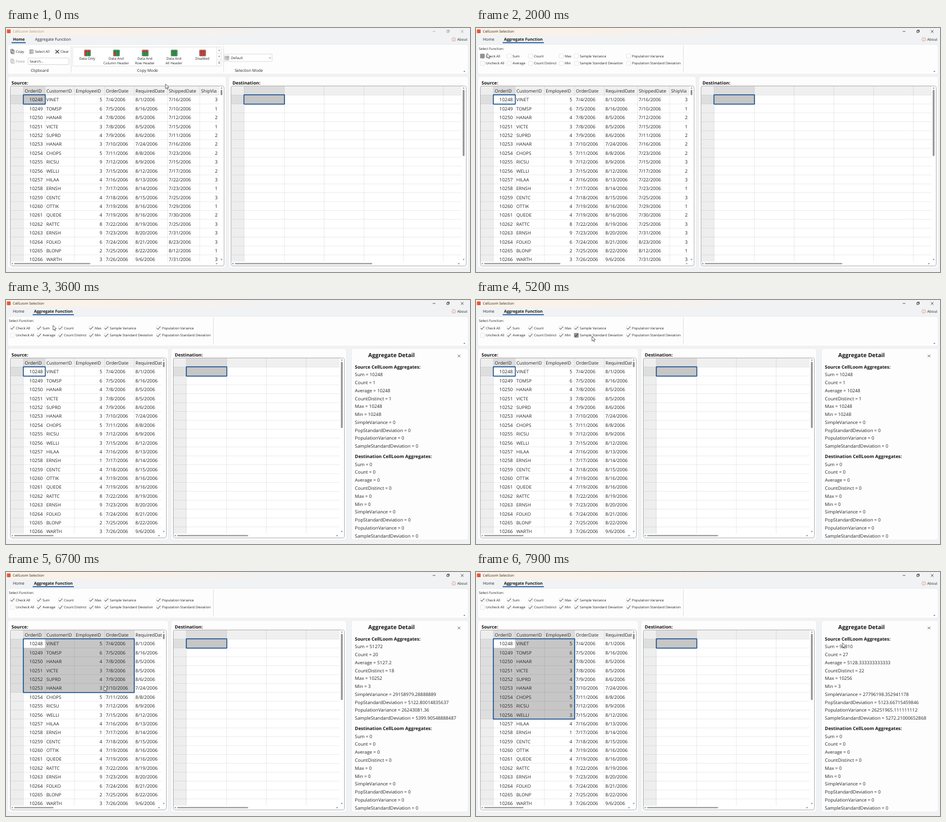
Recreate the animation shown at these times as an HTML page. Size 800 by 423 pixels, loop 8 s.

```html
<!DOCTYPE html>
<html lang="en">
<head>
<meta charset="utf-8">
<title>Grid selection</title>
<style>
html, body { margin: 0; width: 100%; height: 100%; overflow: hidden; background: #f1f2f4; }
svg { display: block; }
#stage { width: 800px; height: 423px; }
text { font-family: "Open Sans", "Noto Sans", sans-serif; fill: #262626; white-space: pre; text-rendering: geometricPrecision; }
.b { font-weight: 700; fill: #151515; }
.dim { fill: #9a9a9a; }
.mid { text-anchor: middle; }
.end { text-anchor: end; }
</style>
</head>
<body>
<svg id="stage" viewBox="0 0 800 423">
  <defs>
    <linearGradient id="bar">
      <stop offset="0" stop-color="#fcf2e6"/>
      <stop offset=".3" stop-color="#f9f1e9"/>
      <stop offset=".6" stop-color="#f2f2f4"/>
      <stop offset="1" stop-color="#f1f2f4"/>
    </linearGradient>
  </defs>
  <g id="ui"></g>
  <path id="cursor" d="M0 0V8.2L1.9 6.5L3.2 9.3L4.5 8.7L3.2 6H5.8Z" fill="#fff" stroke="#333" stroke-width=".7"/>
</svg>
<script>
const LOOP = 8000, STEP = 100;
const CLICK_TAB = 1100, CLICK_ALL = 2100, LAG = 150;
const ROW_H = 15.39, HEAD_H = 15.8;
const BLUE = '#17569b', GREEN = '#2fa24f', RED = '#dc4a3e';

// time, x, y of the pointer tip
const PATH = [
  [0, 275, 97], [200, 262, 86], [900, 80, 20], [1250, 80, 20], [1800, 19, 44], [2100, 19, 44],
  [2500, 708, 191], [2800, 694, 186], [3300, 58, 46], [3600, 81, 44], [4100, 116, 46],
  [4600, 190, 46], [5200, 200, 63], [5400, 190, 68], [5850, 46, 121], [6000, 48, 122],
  [6700, 169, 198], [7150, 150, 244], [7400, 150, 244], [7900, 632, 123]
];
// time, columns, rows of the dragged selection
const DRAG = [[0, 1, 1], [6100, 2, 2], [6300, 3, 3], [6500, 4, 5], [6650, 4, 6], [6900, 3, 7], [7050, 3, 8], [7150, 3, 9]];

// customer, employee, order day, shipping day (days of July), carrier
const ORDERS = `VINET 5 4 16 3,TOMSP 6 5 10 1,HANAR 4 8 12 2,VICTE 3 8 15 1,SUPRD 4 9 11 2,
HANAR 3 10 16 2,CHOPS 5 11 23 2,RICSU 9 12 15 3,WELLI 3 15 17 2,HILAA 4 16 22 3,ERNSH 1 17 23 1,
CENTC 4 18 25 3,OTTIK 4 19 29 1,QUEDE 4 19 30 2,RATTC 8 22 25 3,ERNSH 9 23 31 3,FOLKO 6 24 54 3,
BLONP 2 25 43 1,WARTH 3 26 31 3`;
const TERMS = { 1: 42, 5: 14, 18: 42 };
const date = d => (d > 62 ? `9/${d - 62}` : d > 31 ? `8/${d - 31}` : `7/${d}`) + '/2006';
const ROWS = ORDERS.split(',').map((line, i) => {
  const [who, emp, day, ship, via] = line.trim().split(' ');
  return [10248 + i, who, +emp, date(+day), date(+day + (TERMS[i] || 28)), date(+ship), +via];
});
const HEADS = ['OrderID', 'CustomerID', 'EmployeeID', 'OrderDate', 'RequiredDate', 'ShippedDate', 'ShipVia'];
const SRC_EDGES = [22.5, 60, 110.5, 162.5, 213.5, 271, 326.5, 361.5];
const DST_EDGES = [0, 1, 2, 3, 4, 5, 6].map(i => 22.5 + (i ? 1 : 0) + i * 68.5);

// left edge of the box, then upper and lower label
const CHECKS = [
  [7, 'Check All', 'Uncheck All'], [53, 'Sum', 'Average'], [90, 'Count', 'Count Distinct'], [143, 'Max', 'Min'],
  [169, 'Sample Variance', 'Sample Standard Deviation'], [259, 'Population Variance', 'Population Standard Deviation']
];

const text = (x, y, s, size, cls = '') => `<text x="${x}" y="${y}" font-size="${size}" class="${cls}">${s}</text>`;
const rect = (x, y, w, h, fill, more = '') => `<rect x="${x}" y="${y}" width="${w}" height="${h}" fill="${fill}" ${more}/>`;
const path = (d, stroke, w = .8, fill = 'none') => `<path d="${d}" stroke="${stroke}" stroke-width="${w}" fill="${fill}"/>`;
const box = (x, y, w, h, stroke, r = 1) => rect(x, y, w, h, '#fff', `rx="${r}" stroke="${stroke}" stroke-width=".7"`);
const panel = (x, y, w, h) => rect(x, y, w, h, '#fdfdfd', 'rx="4" stroke="#e6e7e9" stroke-width=".7"');
const arrow = (x, y, turn) => `<path d="M-1.5 1L0 -1.2L1.5 1Z" fill="#777" transform="translate(${x} ${y}) rotate(${turn})"/>`;

function pickStep(list, t) {
  return list.filter(s => s[0] <= t).pop();
}

function pointer(t) {
  const i = PATH.findIndex(p => p[0] > t);
  if (i < 0) return PATH[PATH.length - 1].slice(1);
  const [t0, x0, y0] = PATH[i - 1], [t1, x1, y1] = PATH[i];
  const u = (t - t0) / (t1 - t0), k = u * u * (3 - 2 * u);
  return [x0 + (x1 - x0) * k, y0 + (y1 - y0) * k];
}

function hoveredCheck([x, y]) {
  for (let c = 0; c < CHECKS.length; c++)
    for (let r = 0; r < 2; r++) {
      const [left, ...labels] = CHECKS[c], top = 43.5 + r * 12.5;
      if (x >= left && x < left + 10 + labels[r].length * 3.2 && y >= top && y < top + 9.5) return c * 2 + r;
    }
  return -1;
}

function titleBar(active, agg) {
  const ink = active ? '#222' : '#999';
  const tab = (x, name, on, from, to) => text(x, 22.3, name, 6.9, on ? 'b' : '') +
    (on ? rect(from, 24.6, to - from, 1.7, BLUE) : '');
  return rect(0, 0, 800, 423, '#f1f2f4') + rect(0, 0, 800, 12, 'url(#bar)') +
    rect(1.5, 2.5, 6.5, 6.5, '#e2583e', 'rx="1"') +
    text(11.8, 8.3, 'CellLoom Selection', 6.1, active ? '' : 'dim') +
    path('M735.7 6H740.3M760 4.6H763.2V7.8H760ZM761.2 4.6V3.6H764.3V6.7H763.2M784.4 3.8L788.8 8.2M788.8 3.8L784.4 8.2', ink, .75) +
    tab(12, 'Home', !agg, 9.5, 34) +
    (agg ? tab(48.2, 'Aggregate Function', true, 46, 117) : tab(50, 'Aggregate Function')) +
    `<circle cx="772" cy="19.8" r="3.2" fill="none" stroke="#df8a70" stroke-width=".7"/>` +
    path('M772 19.3V21.6M772 17.9V18.6', '#df8a70', .7) + text(778, 22.2, 'About', 6.2) +
    panel(3, 28.5, 794, 51.5) + '<path d="M788.6 76L790.3 74L792 76Z" fill="#777"/>';
}

function tableIcon(x, y, size, fills) {
  const s = size / 3, gap = size * .025;
  let out = rect(x, y, size, size, '#444', 'rx="1.2"');
  for (let i = 0; i < 9; i++) {
    const c = i % 3, r = i / 3 | 0;
    out += rect(x + c * s + gap, y + r * s + gap, s - 2 * gap, s - 2 * gap, r ? (c ? fills[2] : fills[1]) : fills[0], 'rx=".4"');
  }
  return out;
}

function homeRibbon() {
  const modes = [
    [140, 'Data Only', '', RED, RED, GREEN], [190, 'Data And', 'Column Header', GREEN, RED, GREEN],
    [239.5, 'Data And', 'Row Header', RED, GREEN, GREEN], [289.5, 'Data And', 'All Header', GREEN, GREEN, GREEN],
    [338.5, 'Disabled', '', RED, RED, RED]
  ];
  const white = ['#fff', '#fff', '#fff'];
  const sheets = (y, ink) => path(`M8 ${y}H12V${y + 6}H8ZM9.8 ${y + 1.6}H14V${y + 7.6}H9.8Z`, ink, .8, '#fff');
  return sheets(37, '#444') + text(17, 43.2, 'Copy', 6) +
    tableIcon(40, 37.2, 7.5, white) + text(50, 43.2, 'Select All', 6) +
    path('M85.3 37.8L91.5 44M91.5 37.8L85.3 44', '#333', 1.1) + text(94, 43.2, 'Clear', 6) +
    sheets(53.7, '#aaa') + text(17, 60.2, 'Paste', 6, 'dim') +
    box(38, 52, 70.5, 11.5, '#c9c9c9') + text(41, 60, 'Search...', 6) +
    text(58.2, 76, 'Clipboard', 6.8, 'mid') +
    path('M112.3 31V77M375 31V77', '#d9d9d9') +
    box(115, 33, 256, 33, '#d4d4d4') + path('M363.5 33V66M363.5 44H371M363.5 55H371', '#dedede') +
    arrow(367.5, 38.5, 0) + arrow(367.5, 49.5, 180) + arrow(367.5, 61, 180) + path('M366 58.6H369', '#777') +
    modes.map(([x, a, b, ...f]) => tableIcon(x - 5, 37.7, 11, f) + text(x, 55.2, a, 6, 'mid') + text(x, 63, b, 6, 'mid')).join('') +
    text(244, 76, 'Copy Mode', 6.8, 'mid') +
    box(376.3, 45.2, 82.5, 12.8, '#cfcfcf') + tableIcon(377.5, 48, 7.5, white) + text(388, 53.8, 'Default', 6) +
    path('M453.5 51L455 52.5L456.5 51', '#555') + text(418.5, 76, 'Selection Mode', 6.8, 'mid');
}

function aggRibbon(checked, hover) {
  let out = text(5, 38.3, 'Select Function:', 5.9) + path('M357.5 30V77', '#d9d9d9');
  CHECKS.forEach(([x, ...labels], c) => labels.forEach((label, r) => {
    const id = c * 2 + r, y = 45 + r * 12.6;
    const [fill, edge] = id === hover ? ['#929292', '#858585'] : ['#fff', '#dcdcdc'];
    out += rect(x + .4, y, 7.2, 7.2, fill, `rx=".8" stroke="${edge}" stroke-width=".7"`);
    if (checked && id !== 1) out += path(`M${x + 1.1} ${y + 3.8}L${x + 3} ${y + 5.8}L${x + 7} ${y + 1.2}`, '#222', .95);
    out += text(x + 10, y + 5.8, label, 5.9);
  }));
  return out;
}

function grid(x, w, edges, data, [cols, rows], white, hThumb, vThumb) {
  const y = 100.5, h = 312, vw = w - 8, vh = 304.5;
  const left = edges[0], selW = edges[cols] - left, selH = rows * ROW_H, count = 19;
  let g = rect(0, 0, vw, HEAD_H, '#f0f0f0') + rect(0, 0, left, vh, '#eeeeee');
  g += rect(left, 0, selW, HEAD_H, '#dcdcdc') + rect(0, HEAD_H, left, selH, '#dedede');
  g += rect(left, HEAD_H, selW, selH, '#c6c6c6');
  if (white) g += rect(left, HEAD_H, edges[1] - left, ROW_H, '#fff');
  let d = '';
  for (let i = 0; i < count; i++) d += `M0 ${HEAD_H + i * ROW_H}H${vw}`;
  edges.forEach(e => d += `M${e} 0V${vh}`);
  g += path(d, 'rgba(0,0,0,.115)', .7);
  if (data) {
    HEADS.forEach((name, c) => g += text(edges[c] + 2.3, c < cols ? 11.2 : 11.6, name, 7.85));
    data.forEach((row, r) => row.forEach((v, c) => {
      const num = typeof v === 'number', base = HEAD_H + r * ROW_H + 11.1;
      g += text(num ? edges[c + 1] - 4 : edges[c] + 2, base, v, c === 1 ? 7.85 : 8.15, num ? 'end' : '');
    }));
  }
  const frame = more => rect(left - .2, HEAD_H - .5, selW + .4, selH + .8, 'none', more);
  g += frame(`stroke="${BLUE}" stroke-width="1.5" rx=".6"`) +
    frame('stroke="#222" stroke-opacity=".35" stroke-width=".7" stroke-dasharray="1 1"');
  const bx = x + w - 4.5, by = y + h - 4;
  return rect(x, y, w, h, '#fff', 'rx="3"') +
    `<svg x="${x}" y="${y}" width="${vw}" height="${vh}">${g}</svg>` +
    rect(bx - 1.5, 107, 3, vThumb, '#919191', 'rx="1.5"') + arrow(bx, 104, 0) + arrow(bx, 401.5, 180) +
    rect(x + 6.5, by - 1.1, hThumb, 2.2, '#919191', 'rx="1.1"') + arrow(x + 3, by, -90) + arrow(x + w - 12.5, by, 90) +
    rect(x, y, w, h, 'none', 'rx="3" stroke="#a9a9a9" stroke-width=".9"');
}

function aggregates([cols, rows]) {
  const cells = ROWS.slice(0, rows).flatMap(r => r.slice(0, cols));
  const nums = cells.filter(v => typeof v === 'number'), n = nums.length;
  const sum = nums.reduce((a, v) => a + v, 0);
  // n times the squared deviations stays a whole number, so only the division rounds
  const dev = n * nums.reduce((a, v) => a + v * v, 0) - sum * sum;
  const pop = dev / (n * n), sample = n > 1 ? dev / (n * (n - 1)) : 0;
  const root = v => +Math.sqrt(v).toPrecision(15);
  return [sum, cells.length, sum / n, new Set(cells).size, Math.max(...nums), Math.min(...nums), sample, root(pop), pop, root(sample)];
}

function detail(sel) {
  const names = ['Sum', 'Count', 'Average', 'CountDistinct', 'Max', 'Min', 'SimpleVariance', 'PopStandardDeviation', 'PopulationVariance', 'SampleStandardDeviation'];
  const block = (y, title, values) => text(601.6, y, title + ' CellLoom Aggregates:', 7.9, 'b') +
    names.map((n, i) => text(601.6, y + 13.7 + i * 13.76, `${n} = ${values[i]}`, 7.93)).join('');
  return panel(595.5, 84, 201.5, 332) + text(624.6, 99.4, 'Aggregate Detail', 9.7, 'b') +
    path('M778.8 94.7L783.4 99.3M783.4 94.7L778.8 99.3', '#555') +
    block(118.6, 'Source', aggregates(sel)) + block(274, 'Destination', names.map(() => 0));
}

function screen({ agg, open, hover, sel, shown }) {
  const srcW = open ? 269 : 368.5, dstX = open ? 288.5 : 388, dstW = open ? 295 : 405.5;
  return titleBar(agg, agg) + (agg ? aggRibbon(open, hover) : homeRibbon()) +
    panel(3, 84, srcW + 8, 332) + text(9.4, 98, 'Source:', 7.9, 'b') +
    grid(7.5, srcW, SRC_EDGES, ROWS, sel, agg, open ? 68 : 131.5, 9.5) +
    panel(dstX - 4, 84, dstW + 7.5, 332) + text(dstX + 2.4, 98, 'Destination:', 7.9, 'b') +
    grid(dstX, dstW, DST_EDGES, null, [1, 1], false, open ? 122.5 : 237, 115) +
    (open ? detail(shown) : '');
}

const ui = document.getElementById('ui'), cursor = document.getElementById('cursor');
let lastKey = '';

function draw(t) {
  const tip = pointer(t), agg = t >= CLICK_TAB;
  const state = {
    agg, open: t >= CLICK_ALL + 100, hover: agg ? hoveredCheck(tip) : -1,
    sel: pickStep(DRAG, t).slice(1), shown: pickStep(DRAG, Math.max(0, t - LAG)).slice(1)
  };
  const key = JSON.stringify(state);
  if (key !== lastKey) ui.innerHTML = screen(state);
  lastKey = key;
  cursor.setAttribute('transform', `translate(${tip})`);
}

function tick() {
  const t = performance.now() % LOOP;
  draw(Math.floor(t / STEP) * STEP);
  requestAnimationFrame(tick);
}
tick();
</script>
</body>
</html>
```
